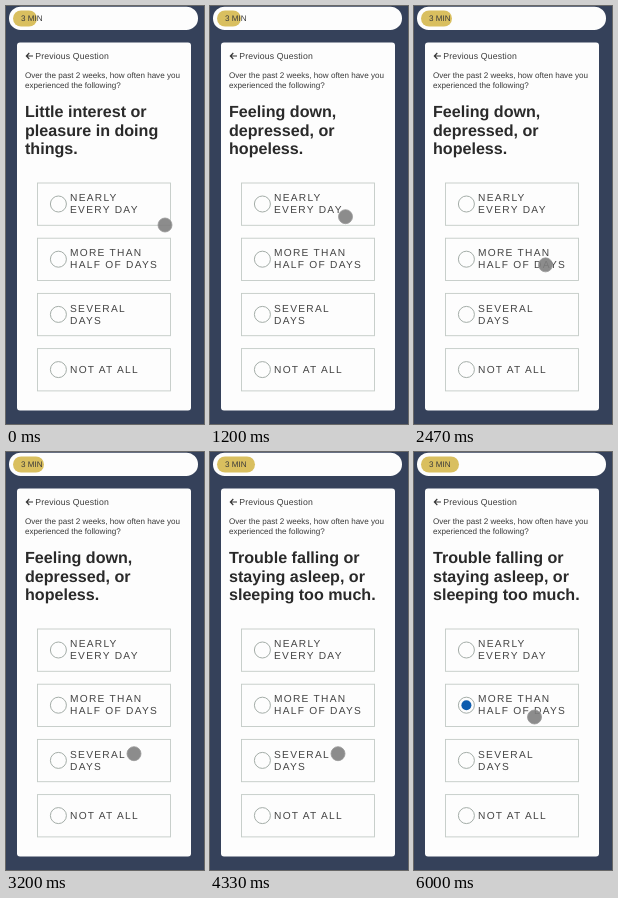
An HTML page for the animation above (6070 ms loop, 198 by 418 pixels).

```html
<!DOCTYPE html>
<html lang="en">
<head>
<meta charset="utf-8">
<title>Questionnaire</title>
<style>
  html, body { margin: 0; width: 100%; height: 100%; overflow: hidden; background: #35415a; }
  svg { display: block; font-family: "Liberation Sans", Arial, sans-serif; fill: #3a3a3a; text-rendering: geometricPrecision; }
  .heading { font-size: 16.1px; font-weight: bold; fill: #2a2a2a; }
  .label { font-size: 10.2px; letter-spacing: 1.28px; fill: #444; }
  .small { font-size: 8.08px; }
  .back { font-size: 8.7px; letter-spacing: .16px; }
</style>
</head>
<body>
<svg id="stage" width="198" height="418" viewBox="0 0 198 418">
  <rect width="198" height="418" fill="#35415a"/>
  <rect x="3" y=".7" width="189" height="23.3" rx="11.6" fill="#fdfdfd"/>
  <rect id="progress" x="7" y="4.5" height="16" rx="8" fill="#d9bf5f"/>
  <text class="small" x="15" y="15.2">3 MIN</text>
  <rect x="11" y="36.5" width="174" height="368" rx="3" fill="#fdfdfd"/>
  <path d="M27 50H20.5M23.3 47L20.3 50L23.3 53" fill="none" stroke="#333" stroke-width="1.1"/>
  <text class="back" x="29.2" y="53">Previous Question</text>
  <text class="small" x="19" y="72">Over the past 2 weeks, how often have you</text>
  <text class="small" x="19" y="81.7">experienced the following?</text>
  <g id="heading"></g>
  <g id="options"></g>
  <circle id="touch" r="7" fill="#808080" fill-opacity=".9" stroke="#999" stroke-opacity=".8"/>
</svg>
<script>
const LOOP = 6070, STEP = 1000 / 15;
const $ = id => document.getElementById(id);

const questions = [
  { start: 0, width: 24, tap: 600, choice: 0,
    lines: ['Little interest or', 'pleasure in doing', 'things.'] },
  { start: 1200, width: 31, tap: 3390, choice: 2,
    lines: ['Feeling down,', 'depressed, or', 'hopeless.'] },
  { start: 3990, width: 38, tap: 5590, choice: 1,
    lines: ['Trouble falling or', 'staying asleep, or', 'sleeping too much.'] }
];

// time, x, y
const touchPath = [
  [0, 159, 219], [500, 135.5, 209], [900, 135.5, 209], [1300, 135.5, 211],
  [2000, 135.5, 211], [2900, 128, 301.7], [4500, 128, 301.7], [5130, 122, 268],
  [5500, 120.5, 265], [LOOP, 120.5, 265]
];

const svgNode = (parent, name, attrs, text = '') => {
  const node = document.createElementNS('http://www.w3.org/2000/svg', name);
  for (const key in attrs) node.setAttribute(key, attrs[key]);
  node.textContent = text;
  return parent.appendChild(node);
};

const headingLines = [0, 1, 2].map(i =>
  svgNode($('heading'), 'text', { class: 'heading', x: 19, y: 111.2 + i * 18.3 }));

const options = ['NEARLY|EVERY DAY', 'MORE THAN|HALF OF DAYS', 'SEVERAL|DAYS', 'NOT AT ALL'].map((label, i) => {
  const cy = 198 + i * 55.2, lines = label.split('|'), group = $('options');
  const box = svgNode(group, 'rect', { x: 31.5, y: cy - 21, width: 133, height: 42.3, stroke: '#c3cbc6', 'stroke-width': .9 });
  svgNode(group, 'circle', { cx: 52.4, cy, r: 8, fill: '#fdfdfd', stroke: '#9aa49f', 'stroke-width': .9 });
  const dot = svgNode(group, 'circle', { cx: 52.4, cy, r: 5 });
  lines.forEach((line, k) =>
    svgNode(group, 'text', { class: 'label', x: 64, y: cy + 3.2 + (k - (lines.length - 1) / 2) * 12 }, line));
  return { box, dot };
});

const clamp = v => Math.max(0, Math.min(1, v));
const ease = v => v * v * (3 - 2 * v);
const mix = (a, b, v) => a + (b - a) * v;

function touchAt(t) {
  const i = Math.max(1, touchPath.findIndex(p => p[0] > t));
  const a = touchPath[i - 1], b = touchPath[i];
  const v = ease((t - a[0]) / (b[0] - a[0]));
  return [mix(a[1], b[1], v), mix(a[2], b[2], v)];
}

function draw(t) {
  const index = questions.findLastIndex(q => t >= q.start);
  const question = questions[index], previous = questions[Math.max(0, index - 1)];
  headingLines.forEach((line, i) => line.textContent = question.lines[i]);
  $('progress').setAttribute('width',
    mix(previous.width, question.width, ease(clamp((t - question.start) / 270))));

  const pressed = t >= question.tap && t < question.tap + 200;
  options.forEach(({ box, dot }, i) => {
    const chosen = i === question.choice && t >= question.tap;
    box.setAttribute('fill', chosen && pressed ? '#b5e1f6' : '#fdfdfd');
    dot.setAttribute('fill', pressed ? '#1676d8' : '#0d5cae');
    dot.setAttribute('visibility', chosen ? 'visible' : 'hidden');
  });

  const [x, y] = touchAt(t);
  $('touch').setAttribute('cx', x);
  $('touch').setAttribute('cy', y);
}

const began = performance.now();
function tick() {
  const t = (performance.now() - began) % LOOP;
  draw(Math.floor(t / STEP) * STEP);
  requestAnimationFrame(tick);
}
tick();
</script>
</body>
</html>
```
